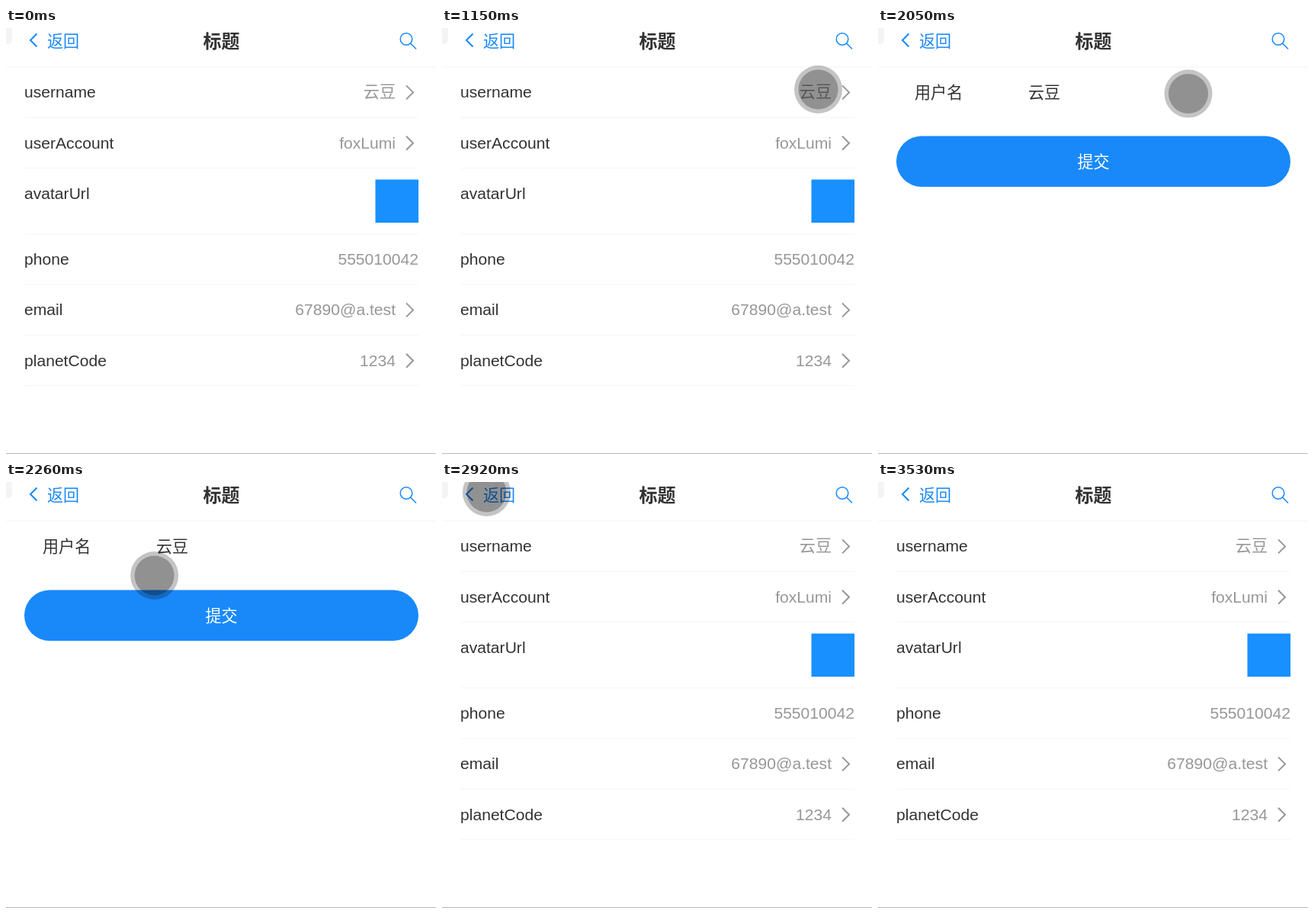
An HTML page for the animation above (4240 ms loop, 564 by 558 pixels).

```html
<!DOCTYPE html>
<html lang="zh-CN">
<head>
<meta charset="utf-8">
<style>
  html, body { margin: 0; width: 100%; height: 100%; overflow: hidden; background: #fff; }
  svg { display: block; width: 564px; height: 558px; }
  text { font: 21.1px "Liberation Sans", "Noto Sans CJK SC", "Noto Sans CJK", sans-serif; fill: #323233; }
  .cjk { font-weight: 300; }
  .value { fill: #969799; text-anchor: end; }
  .title { font-size: 24px; font-weight: bold; text-anchor: middle; }
  .blue { fill: #1989fa; }
  .icon { fill: none; stroke: #969799; stroke-width: 2; }
  .accent { stroke: #1989fa; }
  .rule { stroke: #f7f8f9; stroke-width: 1.5; }
</style>
</head>
<body>
<svg viewBox="0 0 564 558">
  <path d="M0 0H8V15Q8 21 2 21H0Z" fill="#f4f4f4"/>
  <path class="icon accent" d="M40.5 7.5L32 16L40.5 24.5"/>
  <text class="cjk blue" x="54" y="24.5">返回</text>
  <text class="title" x="282.5" y="25.5">标题</text>
  <g class="icon accent" style="stroke-width:1.5">
    <circle cx="525" cy="14.5" r="7.8"/>
    <path d="M530.5 20L538 27.5"/>
  </g>
  <path class="rule" d="M0 51H564"/>
  <path d="M0 557.5H564" stroke="#b8b8b8"/>

  <g id="list">
    <rect x="484.5" y="198.5" width="56.5" height="56.5" fill="#1890ff"/>
  </g>

  <g id="form">
    <text class="cjk" x="48" y="91.5">用户名</text>
    <text class="cjk" x="197" y="91.5">云豆</text>
    <rect x="24" y="141.5" width="517" height="66.5" rx="33.25" fill="#1989fa"/>
    <text class="cjk" x="282.5" y="182.5" text-anchor="middle" style="fill:#fff">提交</text>
  </g>

  <g id="pointer">
    <g id="touch">
      <circle r="31.5" fill-opacity=".23"/>
      <circle r="26" fill-opacity=".26"/>
    </g>
    <path id="arrow" d="M-.5 -.5L27 26H18L21 36L13 39L9.500 31L-.5 39Z" shape-rendering="crispEdges"/>
  </g>
</svg>
<script>
const LOOP = 4240, STEP = 40, OFFSET = 20;
const LIST_TOP = 51, ROW_HEIGHT = 66.3, AVATAR_HEIGHT = 86.1, BASELINE = 40.4;
const byId = id => document.getElementById(id);
const list = byId('list'), form = byId('form'), pointer = byId('pointer');
const touch = byId('touch'), arrow = byId('arrow');

const rows = [
  { label: 'username', value: '云豆', editable: true },
  { label: 'userAccount', value: 'foxLumi', editable: true },
  { label: 'avatarUrl', value: '', height: AVATAR_HEIGHT },
  { label: 'phone', value: '555010042' },
  { label: 'email', value: '67890@a.test', editable: true },
  { label: 'planetCode', value: '1234', editable: true },
];
let top_ = LIST_TOP, markup = '';
for (const { label, value, editable, height = ROW_HEIGHT } of rows) {
  const y = top_ + BASELINE;
  top_ += height;
  markup += `
    <text x="24" y="${y}">${label}</text>
    <text class="value cjk" x="${editable ? 511 : 541}" y="${y}">${value}</text>
    <path class="rule" d="M24 ${top_}H541"/>`;
  if (editable) markup += `<path class="icon" d="M525 ${y - 16}l9 9l-9 9"/>`;
}
list.innerHTML += markup;

const easeOut = u => 1 - (1 - u) ** 2;
const easeIn = u => u * u;

const edge = [562.5, 489.5], entry = [558, 82.5], rest = [523.5, 71.5];
const cell = [493.5, 80.5], back = [58.5, 13.5], exit = [518.5, 399.5];

// sag bends a move downwards, mostly in its second half
const moves = [
  { start: 300, end: 360, from: edge, to: edge },
  { start: 650, end: 820, from: entry, to: rest },
  { start: 1030, end: 1140, from: rest, to: cell },
  { start: 1945, end: 2660, from: cell, to: back, sag: 198.6 },
  { start: 3000, end: 3500, from: back, to: exit, sag: -94, ease: easeIn },
];

function positionAt(t) {
  const { start, end, from, to, sag = 0, ease = easeOut } =
    moves.findLast(move => move.start <= t) ?? moves[0];
  const s = ease(Math.max(0, Math.min(1, (t - start) / (end - start))));
  const [x, y] = from.map((a, i) => a + (to[i] - a) * s);
  return [x, y + 3 * s * s * (1 - s) * sag];
}

const within = (t, from, to) => t >= from && t < to;
const show = (node, on) => { node.style.display = on ? '' : 'none'; };

function draw(t) {
  const editing = within(t, 1480, 2790);
  const arrowShown = within(t, 1610, 1660) || within(t, 2870, 2920);
  show(form, editing);
  show(list, !editing);
  show(pointer, within(t, 310, 360) || within(t, 690, 3530));
  show(arrow, arrowShown);
  show(touch, !arrowShown);
  // the pointer is sampled at a fixed rate, so it moves in small jumps
  const sampled = Math.floor((t - OFFSET) / STEP) * STEP + OFFSET;
  pointer.setAttribute('transform', `translate(${positionAt(sampled)})`);
}

const start = performance.now();
function tick() {
  draw((performance.now() - start) % LOOP);
  requestAnimationFrame(tick);
}
tick();
</script>
</body>
</html>
```
